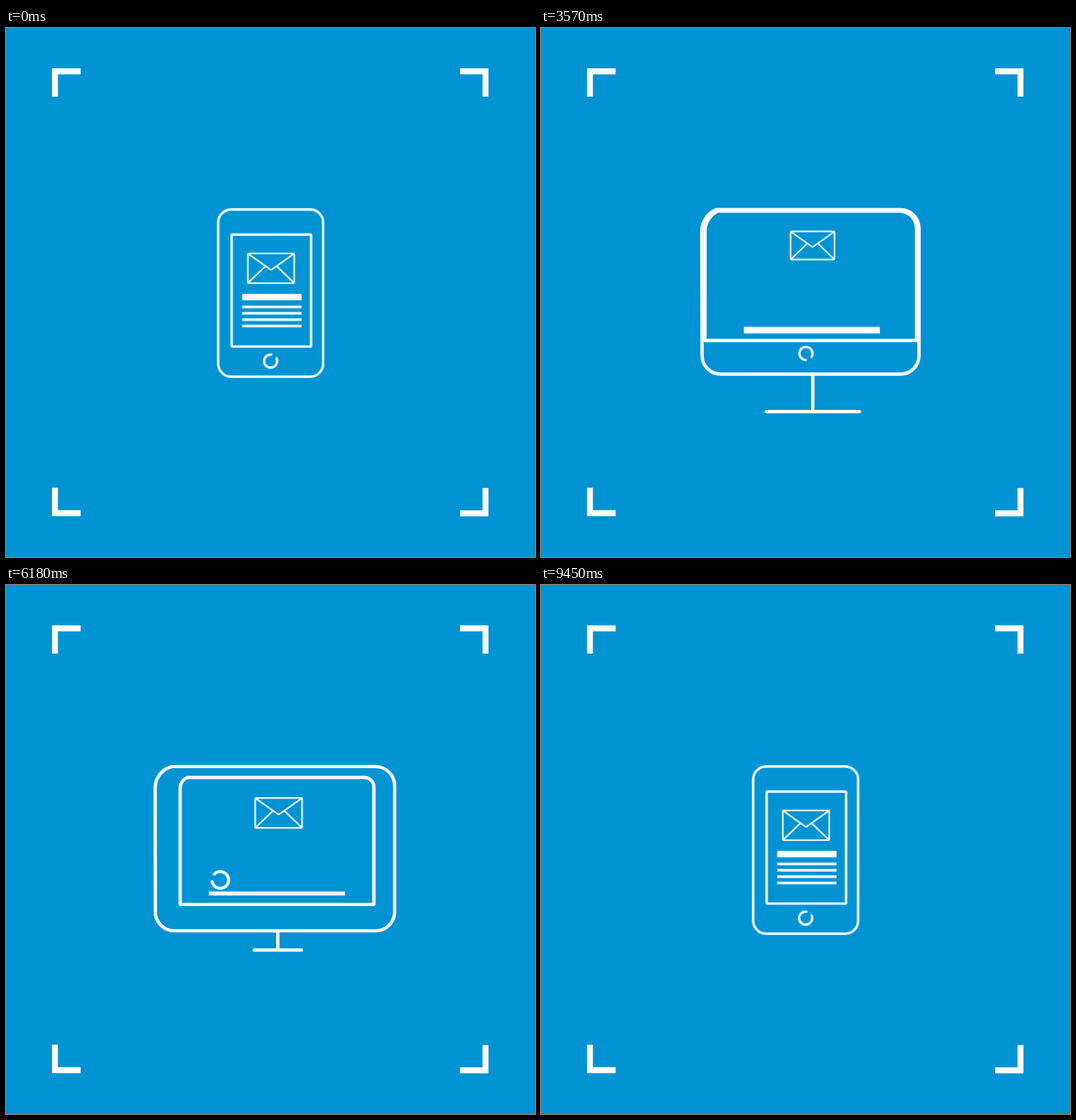
These frames come from a looping animation (748x748 px, 9.48 s). An HTML page without scripts:

```html
<!DOCTYPE html>
<html lang="en">
<head>
<meta charset="utf-8">
<title>Responsive mail</title>
<style>
:root {
  --in: cubic-bezier(.33, 0, .67, .33);
  --out: cubic-bezier(.33, .67, .67, 1);
  --loop: 9480ms;
}
html, body { margin: 0; width: 100%; height: 100%; overflow: hidden; background: #0093d3; }
svg { display: block; width: 100vw; height: 100vh; }
svg { fill: none; stroke: #fff; stroke-linecap: round; stroke-linejoin: round; }
.text rect { fill: #fff; stroke: none; }

.phone, .phone-env, .phone-part, .desk, .desk *, .spin, .text rect {
  animation: var(--loop) ease-in-out infinite both;
}

/* Phone: upright to sideways and back */
.phone { animation-name: turn; }
@keyframes turn {
  0%, 10.127%, 89.14%, 100% {
    transform: translate(374.2px, 374.8px) rotate(0deg) scale(1); stroke-width: 3.4px;
  }
  15.4%, 83.86% {
    transform: translate(379.5px, 372.5px) rotate(90deg) scale(1.566); stroke-width: 2.9px;
  }
}
.phone-env { animation-name: env-turn; }
@keyframes env-turn {
  0%, 10.865%, 90.3%, 100% { transform: translate(.5px, -35.1px) rotate(0deg) scale(1); }
  16.56%, 84.6% { transform: translate(-22.3px, -4.9px) rotate(-90deg) scale(.686); }
}

/* Swap between phone and desktop parts */
.phone-part { animation-name: phone-on; animation-timing-function: step-end; }
.desk { animation-name: desk-on; animation-timing-function: step-end; }
@keyframes phone-on {
  0%, 67.51%, 100% { visibility: visible; }
  33.755% { visibility: hidden; }
}
@keyframes desk-on {
  0%, 67.51%, 100% { visibility: hidden; }
  33.755% { visibility: visible; }
}

/* Desktop: frame, screen, stand, ring and envelope grow out of the phone */
.desk .frame { animation-name: frame; }
@keyframes frame {
  0%, 33.755%, 67.51%, 100% {
    d: path("M194 284.5 A28 28 0 0 1 222 256.5 H537 A28 28 0 0 1 565 284.5 V460.5 A28 28 0 0 1 537 488.5 H222 A28 28 0 0 1 194 460.5 Z");
  }
  38.5%, 62.76% {
    d: path("M229.5 287 A34 34 0 0 1 249 257 H506.5 A26 26 0 0 1 532.5 283 V463.5 A26 26 0 0 1 506.5 489.5 H256 A26 26 0 0 1 230 463.5 Z");
  }
}
.desk .screen { animation-name: screen; }
@keyframes screen {
  0%, 33.755%, 67.51%, 100% {
    d: path("M261 462 V288 A2 2 0 0 1 263 286 H507 A2 2 0 0 1 509 288 V462 Z");
  }
  38.5%, 62.76% {
    d: path("M230 440.5 L229.5 287 A34 34 0 0 1 249 257 H506.5 A26 26 0 0 1 532.5 283 V440.5 Z");
    d: path("M230 440.5 V287 A34 34 0 0 1 249 257 H506.5 A26 26 0 0 1 532.5 283 V440.5 Z");
  }
}
.desk .stand { animation-name: stand; }
@keyframes stand {
  0%, 33.755%, 67.51%, 100% { d: path("M384.3 489 V489 M384.3 489 H384.3"); }
  38.5%, 62.76% { d: path("M384.3 489 V546 M314.3 546 H454.5"); }
}
.desk .ring-box { animation-name: ring-move; }
@keyframes ring-move {
  0%, 33.755%, 67.51%, 100% { transform: translate(228.9px, 372.5px) scale(1.566); }
  38.5%, 62.76% { transform: translate(384.3px, 466px) scale(.97); }
}
.desk .env { animation-name: env-move; }
@keyframes env-move {
  0%, 33.755%, 67.51%, 100% { transform: translate(387.2px, 337.5px) scale(1.075); }
  38.5%, 62.76% { transform: translate(383.7px, 305.5px) scale(.937); }
}

/* Home ring */
svg .spin { animation-name: spin; animation-timing-function: linear; }
@keyframes spin {
  0% { transform: rotate(35deg); }
  13.61% { transform: rotate(-42.5deg); }
  26.27% { transform: rotate(-128deg); }
  33.755% { transform: rotate(-191deg); }
  38.5% { transform: rotate(-321deg); }
  44.94% { transform: rotate(-375deg); }
  60.76% { transform: rotate(-485deg); }
  73.1% { transform: rotate(-592deg); }
  100% { transform: rotate(-685deg); }
}

/* Text bars slide in and out, one after the other */
.text rect { animation-delay: calc(var(--i) * 90ms); }
.text :nth-child(1) { --i: 0; }
.text :nth-child(2) { --i: 1; }
.text :nth-child(3) { --i: 2; }
.text :nth-child(4) { --i: 3; }
.text :nth-child(5) { --i: 4; }

.tall rect { animation-name: tall; }
@keyframes tall {
  0%, 5.38% { transform: translateX(0); animation-timing-function: var(--in); }
  9.95%, 89.03% { transform: translateX(98px); animation-timing-function: var(--out); }
  93.78%, 100% { transform: translateX(0); }
}
.wide rect { animation-name: wide; }
@keyframes wide {
  0%, 15.82%, 65.97% { transform: translateX(-212px); animation-timing-function: var(--out); }
  20.57%, 26.37%, 70.72%, 78.59% { transform: translateX(0); animation-timing-function: var(--in); }
  30.91%, 83.12%, 100% { transform: translateX(-212px); animation-timing-function: var(--out); }
}
.desk .big rect {
  animation-name: rise, drop;
  animation-delay: calc(var(--i) * 90ms), calc(var(--i) * -90ms);
}
@keyframes rise {
  0%, 36.92% { translate: 0 96px; animation-timing-function: var(--out); }
  41.67%, 100% { translate: 0 0; }
}
@keyframes drop {
  0%, 61.81% { transform: translateY(0); animation-timing-function: var(--in); }
  67.09%, 100% { transform: translateY(96px); }
}
</style>
</head>
<body>
<svg viewBox="0 0 748 748">
  <defs>
    <g id="mail" stroke-width="2.2">
      <rect x="-32.8" y="-21" width="65.6" height="42" rx="1.5"/>
      <path d="M-32.2 -20.4 L-1.2 1.6 Q0 2.5 1.2 1.6 L32.2 -20.4 M-32.2 20.4 L-8 -3 M32.2 20.4 L8 -3"/>
    </g>
    <path id="ring" stroke-width="3.2" d="M4.46 -8.05 A9.2 9.2 0 1 1 -4.46 -8.05"/>
    <clipPath id="tall-clip"><rect x="-55" y="-82" width="112" height="157"/></clipPath>
    <clipPath id="wide-clip"><rect x="262" y="287" width="247" height="174"/></clipPath>
    <clipPath id="big-clip"><rect x="231" y="258" width="301" height="180.5"/></clipPath>
  </defs>

  <path stroke-width="8.4" stroke-linecap="butt" stroke-linejoin="miter"
    d="M69.2 97 V61.2 H105.5 M642 61.2 H678 V97 M69.2 650 V686 H105.5 M642 686.3 H678 V650.5"/>

  <g class="phone">
    <g class="phone-part">
      <rect x="-74.2" y="-118.3" width="148.4" height="236.6" rx="18.5"/>
      <rect x="-55.2" y="-82.8" width="112.4" height="158.4" rx="1.5"/>
      <g transform="translate(0 96.2)"><use href="#ring" class="spin"/></g>
      <use href="#mail" class="phone-env"/>
    </g>
    <g class="text tall" clip-path="url(#tall-clip)">
      <rect x="-40.2" y="1.2" width="84" height="9"/>
      <rect x="-40.2" y="17.7" width="84" height="3.7"/>
      <rect x="-40.2" y="26.7" width="84" height="3.7"/>
      <rect x="-40.2" y="35.7" width="84" height="3.7"/>
      <rect x="-40.2" y="44.7" width="84" height="3.7"/>
    </g>
    <g transform="rotate(-90) scale(.63857) translate(-379.5 -372.5)">
      <g class="text wide" clip-path="url(#wide-clip)">
        <rect x="300.7" y="381.4" width="171.8" height="7.6"/>
        <rect x="300.7" y="400.2" width="171.8" height="3.4"/>
        <rect x="300.7" y="414.2" width="171.8" height="3.4"/>
        <rect x="300.7" y="428" width="171.8" height="3.4"/>
      </g>
    </g>
  </g>

  <g class="desk" stroke-width="4.7">
    <path class="stand"/>
    <path class="frame"/>
    <path class="screen"/>
    <g class="ring-box"><g transform="rotate(90)"><use href="#ring" class="spin"/></g></g>
    <use href="#mail" class="env"/>
    <g class="text big" clip-path="url(#big-clip)">
      <rect x="286.8" y="345.8" width="192.4" height="9.4"/>
      <rect x="286.8" y="366.2" width="192.4" height="4.2"/>
      <rect x="286.8" y="381.2" width="192.4" height="4.2"/>
      <rect x="286.8" y="396.2" width="192.4" height="4.2"/>
      <rect x="286.8" y="411.2" width="192.4" height="4.2"/>
    </g>
  </g>
</svg>
</body>
</html>
```
